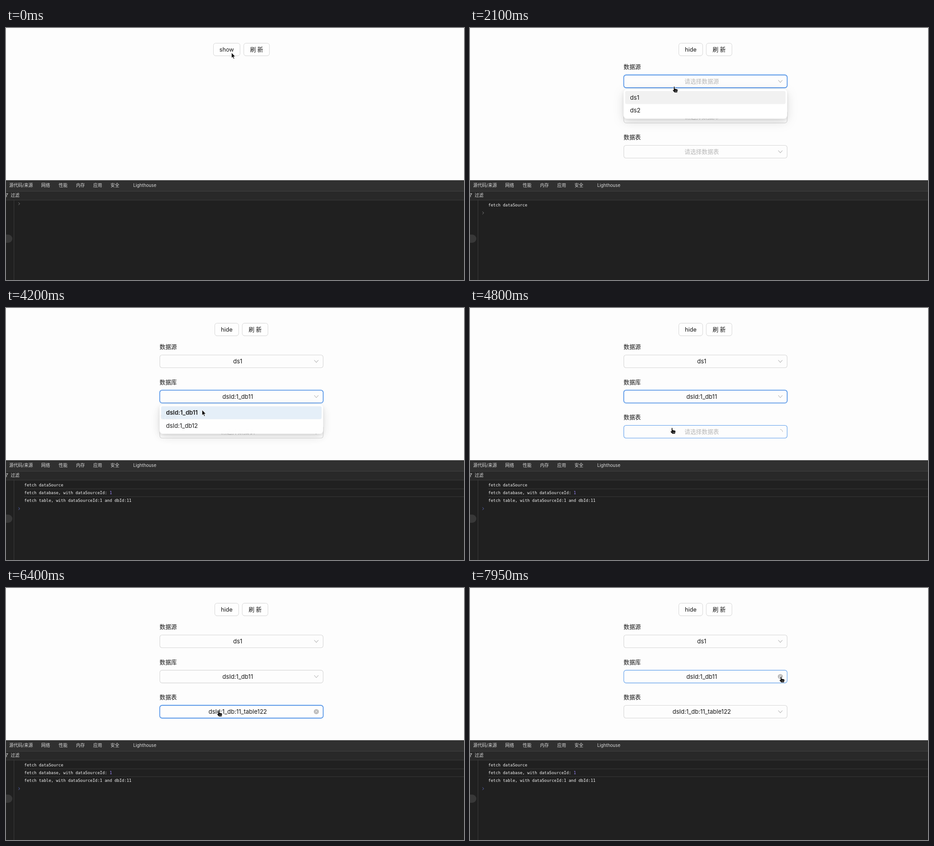
Animation of 1008 by 555 pixels, one loop 8 s. Source, as an HTML page:

```html
<!DOCTYPE html>
<html lang="zh-CN">
<head>
<meta charset="utf-8">
<title>Cascading selects</title>
<style>
  html, body { margin: 0; width: 100%; height: 100%; overflow: hidden; background: #fdfdfd; }
  svg { display: block; width: 1008px; height: 555px; }
  text { white-space: pre; font: 12.65px Inter, "Noto Sans CJK SC", "Noto Sans CJK", sans-serif; fill: #151515; }
  .mid { text-anchor: middle; }
  .cjk { font-weight: 500; }
  .value { font-size: 13.03px; }
  .hint { fill: #b7b7b7; }
  .bold { font-weight: 600; }
  .tab { font-size: 9.72px; fill: #d8d8d8; }
  .log { font: 8.91px "DejaVu Sans Mono", "Liberation Mono", monospace; fill: #f6f6f6; }
  .num { fill: #9c86ff; }
  .line { fill: none; stroke-linecap: round; stroke-linejoin: round; }
  .panel { filter: drop-shadow(0 3px 4px rgba(0,0,0,.09)) drop-shadow(0 6px 12px rgba(0,0,0,.09)) drop-shadow(0 6px 14px rgba(0,0,0,.04)); }
</style>
</head>
<body>
<svg id="stage" viewBox="0 0 1008 555"></svg>
<script>
const LOOP = 8000, STEP = 50, FADE = 200;
const SHOWN = 450, PICK_DB = 4100;

// open: spans of the dropdown; load: span of the spinner; picked: when the first option is chosen
const selects = [
  { y: 103, label: '数据源', options: ['ds1', 'ds2'], menu: 135, origin: 135,
    focus: [1800, 3550], open: [[1800, 2500]], load: [SHOWN, 1450], picked: 2500,
    hover: [[1550, 2250]] },
  { y: 180.6, label: '数据库', options: ['dsId:1_db11', 'dsId:1_db12'], menu: 212.6, origin: 212.6,
    focus: [3550, 5300], open: [[3550, PICK_DB]], load: [2500, 3500], picked: PICK_DB,
    hover: [[2850, 3800], [7850, 8000]] },
  { y: 258, label: '数据表', options: ['dsId:1_db:11_table122', 'dsId:1_db:11_table123'], menu: 189.4, origin: 254,
    focus: [5300, 7450], open: [[5300, 5900], [6700, 7450]], load: [PICK_DB, PICK_DB + 1000], picked: 5900,
    hover: [[4750, 5430], [6300, 7150]] }
];

const logs = [
  [SHOWN, 'fetch dataSource'],
  [2500, 'fetch database, with dataSourceId: <tspan class="num">1</tspan>'],
  [PICK_DB, 'fetch table, with dataSourceId:1 and dbId:11']
];

const tabs = [[7, '源代码/来源'], [77.5, '网络'], [116, '性能'], [154, '内存'], [192, '应用'], [230, '安全'], [280, 'Lighthouse']];

// time, x, y of the pointer tip
const path = [
  [0, 496.3, 54.3], [1200, 496.3, 54.3], [1700, 449.5, 129], [2100, 449.5, 129], [2400, 438, 152],
  [2550, 438, 152], [2950, 435.5, 200.5], [3600, 435.5, 200.5], [3950, 431.6, 224.6], [4300, 431.6, 224.6],
  [4700, 440, 256], [5000, 458, 287], [5200, 462, 278], [5350, 462, 278], [5600, 464, 208],
  [6000, 464, 208], [6400, 468, 270], [6600, 470, 279], [6750, 470, 279], [7100, 684, 272],
  [7200, 719.6, 252.6], [7400, 828, 245], [7500, 828, 245], [7900, 684.5, 195], [8000, 684.5, 195]
];
const handTimes = [[SHOWN, 1300], [1550, 2500], [2850, PICK_DB], [4750, 5900], [6250, 7150], [7850, 8000]];

const clamp = v => Math.max(0, Math.min(1, v));
const within = (t, [a, b]) => t >= a && t < b;
const anyOf = (t, spans) => spans.some(s => within(t, s));
const text = (x, y, str, cls = '') => `<text x="${x}" y="${y}" class="${cls}">${str}</text>`;
const box = (x, y, w, h, r, attrs) => `<rect x="${x}" y="${y}" width="${w}" height="${h}" rx="${r}" ${attrs}/>`;
const line = (d, color, width = 1) => `<path class="line" d="${d}" stroke="${color}" stroke-width="${width}"/>`;

function button(x, w, label, cls = '') {
  return box(x + .5, 34.5, w - 1, 28, 5, 'fill="#000" fill-opacity=".025"') +
    box(x + .5, 33.5, w - 1, 27.5, 5, 'fill="#fefefe" stroke="#d6d6d6"') +
    text(x + w / 2, 51.5, label, 'mid ' + cls);
}

// 1 while open, easing at both ends of each span
function openness(t, spans) {
  for (const [a, b] of spans) {
    if (t >= a && t < b) return 1 - (1 - clamp((t - a) / FADE)) ** 5;
    if (t >= b && t < b + FADE) return 1 - ((t - b) / FADE) ** 5;
  }
  return 0;
}

// opacity of the clear icon
function clearAlpha(t, s) {
  for (const [a, b] of s.hover) {
    if (a < s.picked) continue;
    if (within(t, [a, b])) return clamp((t - a) / 120);
    if (within(t, [b, b + FADE])) return 1 - .8 * (t - b) / FADE;
  }
  return 0;
}

function suffix(t, s) {
  const cy = s.y + 14.4;
  if (within(t, s.load)) {
    const angle = (t - 3300) / 1200 * 360;
    return `<g transform="rotate(${angle} 683 ${cy})">` + line(`M678 ${cy}a5 5 0 0 1 5 -5`, '#b5b5b5') + '</g>';
  }
  const alpha = clearAlpha(t, s);
  const dark = within(t, [7050, 7400]) ? '#808080' : '#b2b2b2';
  let out = line(`M678.7 ${cy - 2.3}l4.3 4.8 4.3 -4.8`, '#b8b8b8', 1.1);
  if (alpha) {
    out += `<g opacity="${alpha}"><circle cx="683" cy="${cy}" r="5.6" fill="${dark}"/>` +
      line(`M681 ${cy - 2}l4 4m0 -4l-4 4`, '#fff') + '</g>';
  }
  return out;
}

function field(t, s) {
  const focus = within(t, s.focus), hover = anyOf(t, s.hover);
  const chosen = t >= s.picked, open = anyOf(t, s.open);
  const border = focus ? '#2f7be0' : hover ? '#5a9cec' : '#d6d6d6';
  const value = chosen ? text(510, s.y + 18.9, s.options[0], 'mid value' + (open ? ' hint' : ''))
                       : text(510, s.y + 18.9, '请选择' + s.label, 'mid hint');
  return text(338, s.y - 12.6, s.label, 'cjk') +
    (focus ? box(337, s.y - 1, 362, 31, 6.5, 'fill="none" stroke="#0591ff" stroke-opacity=".08" stroke-width="2"') : '') +
    box(338.5, s.y + .5, 359.5, 28, 5, `fill="#fdfdfd" stroke="${border}" stroke-width="${focus ? 1.3 : 1.1}"`) +
    value + suffix(t, s);
}

function menu(t, s) {
  const p = openness(t, s.open);
  if (!p) return '';
  const chosen = t >= s.picked, y = s.menu;
  const tinted = s === selects[2] && !chosen;
  const scale = .8 + .2 * p;
  const row = attrs => box(341.5, y + 3.8, 353, 28.6, 3.5, attrs);
  return `<g opacity="${p}" transform="translate(0 ${s.origin * (1 - scale)}) scale(1 ${scale})">` +
    box(338, y, 360, 64.8, 7, `class="panel" fill="${tinted ? '#f8f8f8' : '#fff'}"`) +
    row(`fill="${tinted ? '#f5f5f5' : '#f1f1f1'}"`) +
    row(`fill="#e0effc" opacity="${clamp((t - s.picked) / 150)}"`) +
    text(352.3, y + 22.7, s.options[0], chosen ? 'value bold' : 'value') +
    text(352.3, y + 51.4, s.options[1], 'value') + '</g>';
}

function devtools(t) {
  const seen = logs.filter(l => t >= l[0]);
  const n = seen.length;
  let out = box(0, 335.5, 1008, 219.5, 0, 'fill="#202020"') +
    box(0, 335.5, 1008, 23.5, 0, 'fill="#303030"') +
    box(0, 360, 1008, 18, 0, 'fill="#292929"') +
    line('M0 359.5H1008M0 379H1008', '#404040') +
    line('M17.5 379V555', '#3b3b3b') +
    box(-12, 455, 26, 18, 9, 'fill="#383838"') +
    line('M-4 364.8H4L1.2 368.3V372', '#c4c4c4', 1.1) +
    text(10.3, 372.1, '过滤', 'tab') +
    tabs.map(([x, label]) => text(x, 349.9, label, 'tab')).join('');
  seen.forEach(([, str], i) => {
    if (i) out += line(`M40 ${381.2 + i * 17.2}H1008`, '#393939');
    out += text(40.3, 393 + i * 17.2, str, 'log');
  });
  const y = n ? 390 + n * 17.3 : 387;
  return out + line(`M27.7 ${y - 2.5}l2.6 2.5 -2.6 2.5`, n > 1 ? '#5c6cc0' : '#828282');
}

function pointer(t) {
  const i = path.findIndex(k => k[0] > t);
  const [t0, x0, y0] = path[i - 1], [t1, x1, y1] = path[i];
  const u = (t - t0) / (t1 - t0), e = u * u * (3 - 2 * u);
  const shape = anyOf(t, handTimes)
    ? '<path d="M-1.3 1a1.3 1.3 0 0 1 2.6 0V4.6L6.6 5.8Q8 6.3 7.8 8.3L6.8 13.2H.5L-3.4 8.6Q-3.8 7 -2.4 7L-1.3 7.8Z"/>' +
      '<path class="line" d="M1.6 8.5v3M3.5 8.5v3M5.4 8.5v3" stroke-width=".5"/>'
    : '<path d="M0 0V11.8L2.7 9.4 4.6 13.8 6.5 13 4.6 8.7H8.2Z"/>';
  return `<g transform="translate(${x0 + (x1 - x0) * e} ${y0 + (y1 - y0) * e})" stroke="#fff" stroke-width=".8">${shape}</g>`;
}

function scene(t) {
  const shown = t >= SHOWN;
  let out = box(0, 0, 1008, 336, 0, 'fill="#fdfdfd"') +
    (shown ? button(459, 53.5, 'hide') + button(519.5, 57.5, '刷 新', 'cjk')
           : button(456, 59.5, 'show') + button(522.8, 57.5, '刷 新', 'cjk'));
  if (shown) {
    out += selects.map(s => field(t, s)).join('') + selects.map(s => menu(t, s)).join('');
  }
  return out + devtools(t) + pointer(t);
}

const stage = document.getElementById('stage');
const start = performance.now();
let last = -1;
function tick() {
  const t = Math.floor((performance.now() - start) % LOOP / STEP) * STEP;
  if (t !== last) stage.innerHTML = scene(last = t);
  requestAnimationFrame(tick);
}
tick();
</script>
</body>
</html>
```
